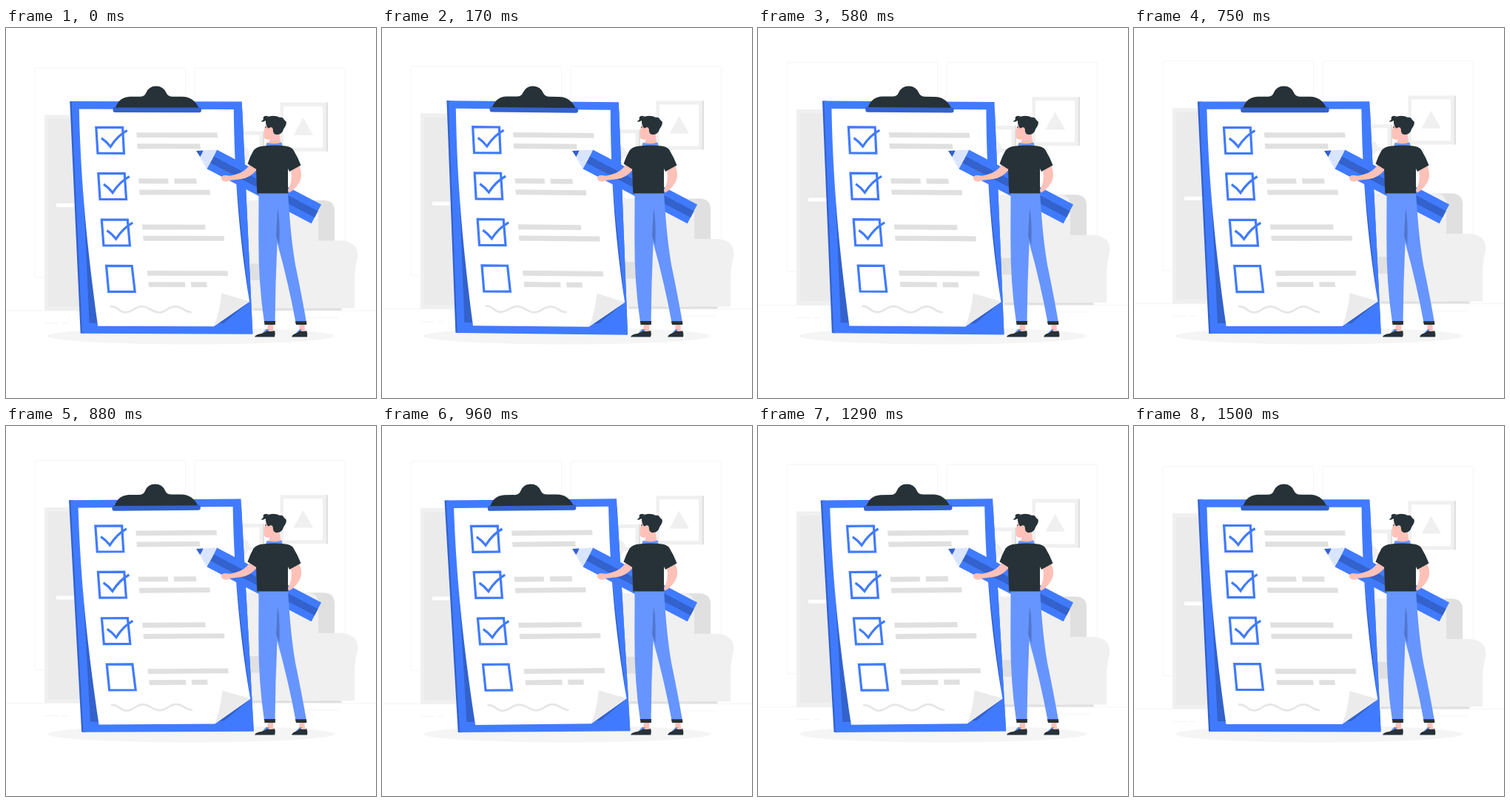
These frames come from a looping animation (500x500 px, 1540 ms). An HTML page:

```html
<!DOCTYPE html>
<html lang="en">
<head>
<meta charset="utf-8">
<title>Checklist</title>
<style>
  html, body { margin: 0; width: 100%; height: 100%; overflow: hidden; background: #fff; }
  svg { display: block; width: 100vw; height: 100vh; }
  .blue { fill: #407bff; }
  .deep { fill: #3362cc; }
  .denim { fill: #6695ff; }
  .dark { fill: #263238; }
  .skin { fill: #ffc1b8; }
  .g1 { fill: #f0f0f0; }
  .g2 { fill: #ebebeb; }
  .g3 { fill: #e0e0e0; }
  .white { fill: #fff; }
  .line { fill: none; stroke: #f5f5f5; }
  .ink { fill: none; stroke: #407bff; stroke-width: 3.2; }
</style>
</head>
<body>
<svg viewBox="0 0 500 500" xmlns="http://www.w3.org/2000/svg">
  <g id="room">
    <g class="line">
      <rect x="39" y="54.5" width="203.5" height="283" rx="2"/>
      <rect x="255" y="54.5" width="203.5" height="283" rx="2"/>
      <path d="M0 382.5H500M52 399.5H71M76 399.5H84M398 392H449"/>
    </g>
    <!-- cabinet -->
    <path class="g1" d="M52 118H150V382.5H52Z"/>
    <path class="g2" d="M57 123.5H150V377H57Z"/>
    <path class="white" d="M68 237.5H110V242.5H68Z"/>
    <!-- wall frames -->
    <path class="g1" d="M290 140H347V176H290Z"/>
    <path class="g3" d="M347 140H349V176H347Z"/>
    <path class="white" d="M294 145H342.5V171H294Z"/>
    <path class="g1" d="M370.5 101.2H432.5V167.3H370.5Z"/>
    <path class="g3" d="M432.5 101.2H435V167.3H432.5Z"/>
    <path class="white" d="M375 106.2H428V162.3H375Z"/>
    <path class="g1" d="M388.5 145.5L401.5 121.5L415 145.5Z"/>
    <path class="g1" d="M310 162H323Q329 164 329 171Q328 178 322 182H310Z"/>
    <!-- armchair -->
    <path class="g3" d="M333 376H453.5V382.3H333Z"/>
    <path class="g3" d="M405 233.3H430Q444 234 444 248V300H405Z"/>
    <path class="g1" d="M316 233.3H408Q422 234 422 248V379.3H316Z"/>
    <path class="g3" d="M316 319H345V341.5H316Z"/>
    <path class="g1" d="M392 287.8H452Q476 289 475.5 309Q471 326 471 341V379.3H380V345Q396 330 396 310Q396 296 392 287.8Z"/>
  </g>

  <ellipse cx="250" cy="416.2" rx="194" ry="11.3" fill="#f5f5f5"/>

  <g id="board">
    <path class="deep" d="M86 99.3H92L106 413.2L101 412.8Z"/>
    <path class="blue" d="M88.3 99.3H318.5L333.7 413.6L103.3 413Z"/>
    <path class="deep" d="M99 110L112.8 399H294L329 370L300 110Z"/>
    <path class="blue" d="M308 110H319L333.6 412H281L294 399Q313 387 329 370Z"/>
    <path class="white" d="M98.5 109.7H307.5C308.5 190 314 275 329.3 369.5L281 403H124.5C110 300 101 210 98.5 109.7Z"/>
    <path class="g2" d="M291.5 358L329.5 369.3L281 403Q289 385 291.5 358Z"/>
    <rect class="deep" x="144.3" y="106.8" width="119.4" height="7.4" rx="3"/>
    <path class="dark" d="M147.7 107.5Q152.5 93.5 167 92.8H180Q187 93 189 87.5Q193 78.5 202.5 78.5Q212.5 78.5 216.5 88Q218.5 92.7 225 92.7H238Q253 93 260 107.5Z"/>
    <g id="bars" class="g3"></g>
    <g id="boxes" class="ink"></g>
    <path d="M141 376.5C152 375 152 384.5 162 384.3S174 376.3 184 376.3S197 384.3 207 384.3S219 376.3 229 376.3S241 384.5 251 383.8" fill="none" stroke="#e6e6e6" stroke-width="2.7"/>
  </g>

  <g id="pencil">
    <path class="blue" d="M285 164.5L426 238.5L412.7 264.3L271.3 190.3Z"/>
    <path class="deep" d="M280.3 173.3L421.6 247.3L417 256L275.8 182Z"/>
    <path d="M257 166L285 164.5Q280 176 271.3 190.3Z" fill="#d9e5ff"/>
    <path class="deep" d="M257 166L266.5 165.5Q265 170 262.3 174Z"/>
  </g>

  <g id="man">
    <path class="skin" d="M385 192L396.5 186.5Q401.5 199 397 207.5Q392 217 383 222.5L380.5 220Q388 207 385 192Z"/>
    <path class="skin" d="M354 400.5H361.5L361 411H352.5ZM396.5 400.5H403.5L404 411H396Z"/>
    <path class="denim" d="M351 407L356 407L352 412H347ZM397 407L400 407L396 412H392Z"/>
    <path class="dark" d="M336 417.5Q337 414 345 413Q350 411.5 353 409Q357 411 363 409Q364.5 413 363 417.5ZM386 417.5Q387 414 392 412.5Q395 411 397 409Q402 411 406 409Q408 413 407 417.5Z"/>
    <path class="denim" d="M341.5 222H381C383.5 262 386 290 391 320Q400 363 406 398H391.5Q382 346 366.5 290Q364 345 363.5 398H349Q341 345 341.3 285Z"/>
    <path d="M367 243.5Q370.5 260 369.3 293L365 282Z" fill="#5177cc"/>
    <path class="dark" d="M348.8 396H364L363.8 401H349.5ZM390.8 396.3H406L406.3 401H392Z"/>
    <path class="skin" d="M330 183.5L339 191.5Q330 202.5 318 204L304 205.7Q295 210 291.3 205Q289.5 199.5 296 199L303 199.8Q319 196.5 325.5 189.5Z"/>
    <path class="skin" d="M351.5 129Q347.8 137 348.8 147Q350 152 356.5 150.5L354.5 157Q363 162 371.5 156L369.5 143L366 132Z"/>
    <path class="denim" d="M352.5 155Q363 157.5 372.5 154.5L374 160H351Z"/>
    <path class="dark" d="M348 159.5Q362 157.5 378 159.5Q386 160.5 388.5 165Q394 174 398.5 185.5L383 194L381 190V223.5H339.3L338 190.8L326.5 183.5Q330 173 334.5 165.5Q339 160 348 159.5Z"/>
    <path class="dark" d="M351 122C356 118 364 117.5 370 121C376 120 374 124 378.3 126C380.5 131 375 135 374 139.5C371 145 364 145.5 361.5 141.5L359.5 134.5L354 135.5Q350.5 130 351 125Q347.5 127.5 344.5 126.3Q349 124 347.5 121Q349 117.5 355 119.5Z"/>
    <ellipse class="skin" cx="357.8" cy="138" rx="3" ry="3.8"/>
    <path d="M350 134.5L352 133.5" fill="none" stroke="#263238"/>
  </g>
</svg>
<script>
const LOOP = 1540, LEAD = 40;
const $ = id => document.getElementById(id);

// Grey lines of writing: left, right, top
$('bars').innerHTML = [
  [176, 285, 141.2], [176.8, 262, 156.3],
  [179, 219, 203.5], [227, 257, 203.5], [180, 275.3, 218.6],
  [184, 269, 265.6], [185.2, 294.5, 280.8],
  [190.8, 299.5, 328], [192.5, 242, 343.2], [250, 271.3, 343.2]
].map(([l, r, y]) => `<path d="M${l} ${y}H${r}l.7 6.9H${l + .7}Z"/>`).join('');

// Boxes lean further right towards the foot of the sheet: x, y, lean
$('boxes').innerHTML = [
  [121.6, 134.5, 1.9], [124.7, 196.7, 2.4], [129.3, 259.2, 3.2], [135.7, 321.6, 4.1]
].map(([x, y, lean], i) => {
  const box = `M${x} ${y}h${35.8 - i * .4}l${lean} 34.9h-35.5Z`;
  const tick = i < 3 ? `M${x + 7.2} ${y + 14.6}Q${x + 14} ${y + 19} ${x + 19.4} ${y + 26}Q${x + 29} ${y + 11} ${x + 42} ${y + 4}` : '';
  return `<path d="${box}${tick}"/>`;
}).join('');

// Triangle wave: 0 at the start, 1 halfway, 0 at the end
const tri = p => 1 - Math.abs(1 - 2 * (p - Math.floor(p)));

function draw(ms) {
  const p = (ms + LEAD) / LOOP;
  const angle = 2 * tri(p + .25) - 1;
  $('room').setAttribute('transform', `translate(0 ${-10 * tri(p)})`);
  $('board').setAttribute('transform', `rotate(${angle} 210 246)`);
}

const start = performance.now();
function tick() {
  draw((performance.now() - start) % LOOP);
  requestAnimationFrame(tick);
}
tick();
</script>
</body>
</html>
```
